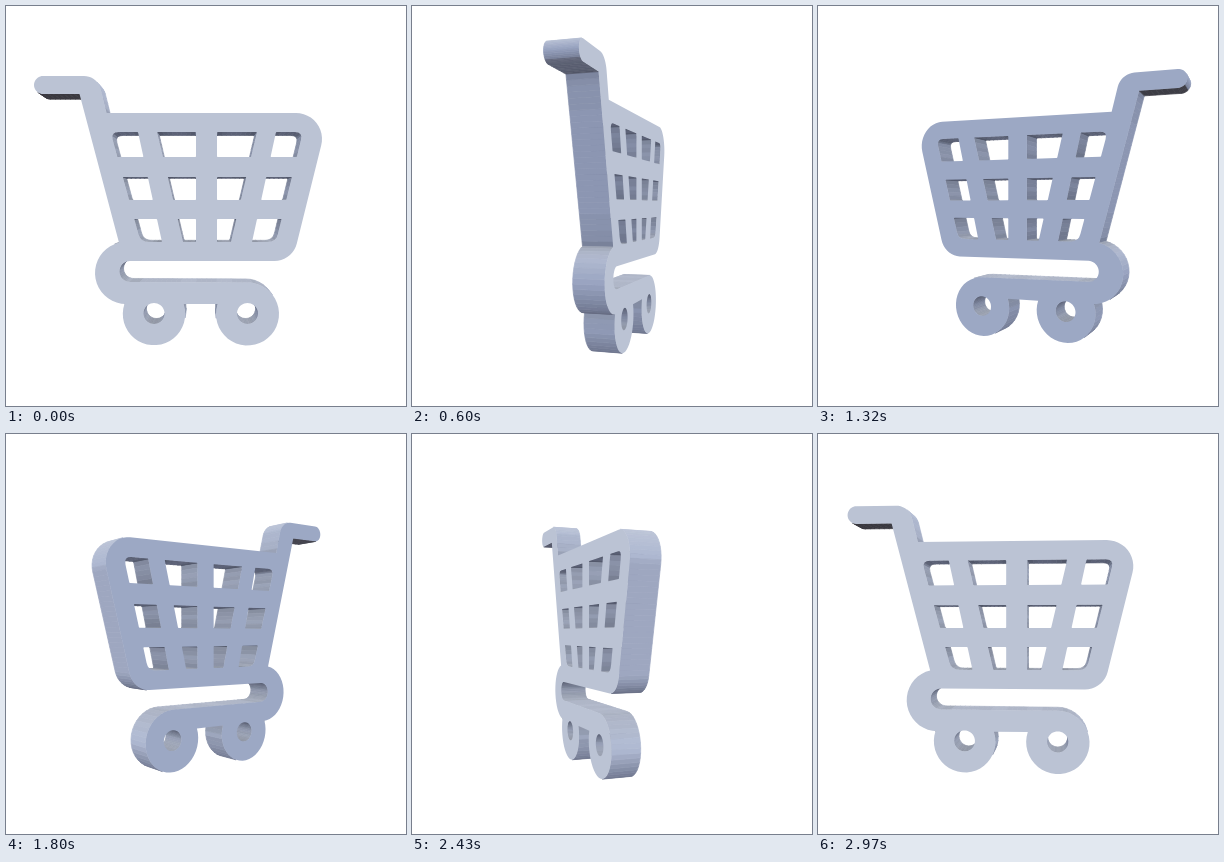
Write an HTML page with a canvas that moves like this. It is 400 px wide and 400 px high and loops after 3000 ms.

```html
<!DOCTYPE html>
<html>
<head>
<meta charset="utf-8">
<title>Rotating cart</title>
<style>
html, body { margin: 0; width: 100%; height: 100%; overflow: hidden; background: #fff; }
canvas { display: block; width: 400px; height: 400px; }
</style>
</head>
<body>
<canvas id="stage" width="400" height="400"></canvas>
<script>
const ctx = document.getElementById('stage').getContext('2d');
const LOOP = 3000, STEP = 30, MID = 200;
const DIST = 600, DEPTH = 28;         // camera distance, thickness of the cart
const FLAT = 1 - DEPTH / DIST;        // front-view pixels to model units

const FRONT = [187, 195, 212], BACK = [156, 168, 196];
// Wall colours by the direction they face
const RIGHT = [174, 184, 209], LEFT = [152, 163, 192];
const UP = [190, 198, 216], DOWN = [106, 113, 137], SHADE = [58, 57, 64];

const mix = (a, b, k) => a.map((v, i) => v + (b[i] - v) * k);
const rgb = c => `rgb(${c.map(Math.round)})`;

function trace(path, points) {
  points.forEach((p, i) => i ? path.lineTo(...p) : path.moveTo(...p));
  path.closePath();
}

// Points on an arc; angles in degrees, clockwise when rising
function arc(cx, cy, r, from, to) {
  const n = Math.max(2, Math.ceil(Math.abs(to - from) / 9));
  return Array.from({ length: n + 1 }, (_, i) => {
    const a = (from + (to - from) * i / n) * Math.PI / 180;
    return [cx + r * Math.cos(a), cy + r * Math.sin(a)];
  });
}

// Polygon of [x, y, radius] with rounded corners
function rounded(corners) {
  const n = corners.length;
  const toward = (p, q, d) => mix(p, q, d / Math.hypot(q[0] - p[0], q[1] - p[1]));
  return corners.flatMap((p, i) => {
    const a = toward(p, corners[(i + n - 1) % n], p[2]);
    const b = toward(p, corners[(i + 1) % n], p[2]);
    return [0, .25, .5, .75, 1].map(t => [0, 1].map(j =>
      a[j] * (1 - t) ** 2 + 2 * p[j] * t * (1 - t) + b[j] * t * t));
  });
}

const outline = [
  ...arc(37, 79, 9, 90, 270),
  ...arc(78, 87, 17, 270, 345),
  [100.5, 107],
  ...arc(290, 133, 26, 270, 374),
  ...arc(268.5, 232, 23, 14, 90),
  ...arc(124, 265.5, 10.5, 270, 90),
  ...arc(241.5, 308, 31.5, -90, 198.5),
  ...arc(148, 308, 31.2, -18.7, 198.7),
  ...arc(120, 267, 31, 90, 257),
  [73.5, 88]
];

// Basket holes: column edges at the top and bottom of the grid
const rows = [[126, 151], [171, 194], [213, 236]];
const columns = [
  [[104.5, 134.5], [132, 156]],
  [[151, 177], [190, 190]],
  [[211, 211], [251, 225]],
  [[270, 246], [297, 270]]
];
const edgeX = ([top, bottom], y) => top + (bottom - top) * (y - 126) / 110;
const holes = rows.flatMap(([y0, y1], r) => columns.map(([l, rt], c) => {
  const radius = (row, col) => r === row && c === col ? 8 : 1;
  return rounded([
    [edgeX(l, y0), y0, radius(0, 0)],
    [edgeX(l, y1), y1, radius(2, 0)],
    [edgeX(rt, y1), y1, radius(2, 3)],
    [edgeX(rt, y0), y0, radius(0, 3)]
  ]);
}));
const hubs = [148, 241.5].map(x => arc(x, 307.5, 10.5, 360, 9));

const loops = [outline, ...holes, ...hubs].map(loop =>
  loop.map(p => p.map(v => (v - MID) * FLAT)));
const solid = new Path2D();
loops.forEach(loop => trace(solid, loop));

// Share of the space in front of a wall that is filled by other parts
function occlusion([x, y], nx, ny) {
  const facing = Math.atan2(ny, nx);
  const samples = [-1.1, -.55, 0, .55, 1.1].flatMap(turn => [8, 20, 40].map(d =>
    ctx.isPointInPath(solid, x + d * Math.cos(facing + turn),
      y + d * Math.sin(facing + turn), 'evenodd')));
  return samples.filter(Boolean).length / samples.length;
}

// Side walls, long edges cut into short pieces for shading and depth sorting
const walls = loops.flatMap((loop, which) => loop.flatMap((a, i) => {
  const b = loop[(i + 1) % loop.length];
  const len = Math.hypot(b[0] - a[0], b[1] - a[1]);
  if (len < .01) return [];
  const nx = (b[1] - a[1]) / len, ny = (a[0] - b[0]) / len;
  const base = mix(nx > 0 ? RIGHT : LEFT, ny < 0 ? UP : DOWN, Math.abs(ny));
  const under = which === 0 && ny > .7 && a[1] < -50;
  const n = Math.ceil(len / 5);
  return Array.from({ length: n }, (_, k) => {
    const mid = mix(a, b, (k + .5) / n);
    const light = 1 - .4 * occlusion(mid, nx, ny);
    return {
      a: mix(a, b, k / n), b: mix(a, b, (k + 1) / n), mid, nx, ny, under,
      color: base.map(v => v * light)
    };
  });
}));

function draw(time) {
  const angle = 2 * Math.PI * time / LOOP;
  const cos = Math.cos(angle), sin = Math.sin(angle);
  const camX = -DIST * sin, camZ = DIST * cos;

  const project = ([x, y], z) => {
    const k = DIST / (DIST + x * sin - z * cos);
    return [MID + (x * cos + z * sin) * k, MID + y * k];
  };
  const range = ({ mid }) => Math.hypot(mid[0] - camX, mid[1], DEPTH / 2 - camZ);

  ctx.fillStyle = '#fff';
  ctx.fillRect(0, 0, 400, 400);
  ctx.lineWidth = .7;
  ctx.lineJoin = 'round';

  walls
    .filter(w => (camX - w.a[0]) * w.nx - w.a[1] * w.ny > 0)
    .sort((p, q) => range(q) - range(p))
    .forEach(w => {
      const color = w.under ? mix(w.color, SHADE, Math.abs(cos)) : w.color;
      ctx.fillStyle = ctx.strokeStyle = rgb(color);
      ctx.beginPath();
      trace(ctx, [project(w.a, 0), project(w.b, 0), project(w.b, DEPTH), project(w.a, DEPTH)]);
      ctx.fill();
      ctx.stroke();
    });

  // The face turned to the camera hides every wall behind it
  const front = camZ > DEPTH;
  if (!front && camZ >= 0) return;
  ctx.fillStyle = rgb(front ? FRONT : BACK);
  ctx.beginPath();
  loops.forEach(loop => trace(ctx, loop.map(p => project(p, front ? DEPTH : 0))));
  ctx.fill('evenodd');
}

const start = performance.now();
function tick() {
  const time = (performance.now() - start) % LOOP;
  draw(Math.floor(time / STEP) * STEP);
  requestAnimationFrame(tick);
}
tick();
</script>
</body>
</html>
```
